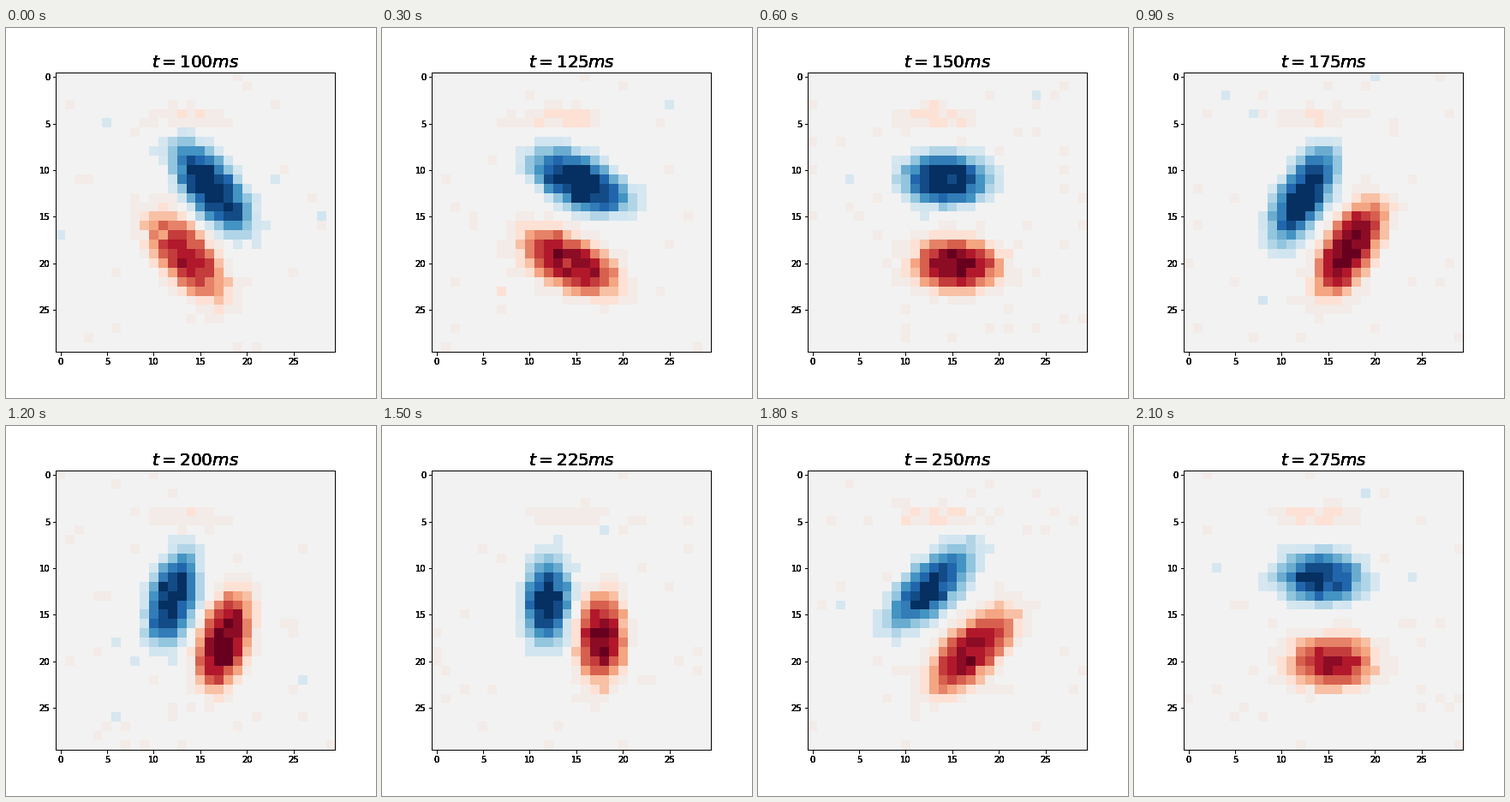
A matplotlib script that plays this animation: 432x432 px, repeating every 2.4 s.

```python
import matplotlib.pyplot as plt
import numpy as np
from matplotlib.animation import FuncAnimation
from matplotlib.colors import LinearSegmentedColormap, to_rgb

SIZE, DPI, CELLS = 432, 72, 30
STEP_MS, STEPS = 300, 8
CENTRE = np.array([14.8, 15.6])

SHADES = LinearSegmentedColormap.from_list("shades", [
    "#67001f", "#b2182b", "#d6604d", "#f4a582", "#fddbc7", "#f2f2f2",
    "#d1e5f0", "#92c5de", "#4393c3", "#2166ac", "#053061"], N=21)
palette = SHADES(np.arange(21))[:, :3]
palette[8:12] = [to_rgb(c) for c in ("#fde1d5", "#f3ebe7", "#f2f2f2", "#d6e7f0")]

rows, cols = np.mgrid[:CELLS, :CELLS]


def lobe(centre, long, short, tilt):
    """Flat-topped ellipse, tilted clockwise."""
    x, y = cols - centre[0], rows - centre[1]
    u = x * np.cos(tilt) + y * np.sin(tilt)
    v = y * np.cos(tilt) - x * np.sin(tilt)
    return np.exp(-((u / long) ** 2 + (v / short) ** 2) ** 1.5)


def signal(t):
    """A blue and a red lobe that swing around each other."""
    tilt = np.radians(np.interp(t, [100, 150, 175, 225, 275],
                                [50, 2, -60, -88, 0]))
    upright = np.sin(tilt) ** 2
    lean = 0.55 * tilt - np.radians(8)
    offset = (4.6 - 1.1 * upright) * np.array([np.sin(lean), -np.cos(lean)])
    shape = (4.6 + 1.2 * abs(np.sin(2 * tilt)), 2.8 - 0.3 * upright, tilt)

    phase = (t - 100) / 175
    blue = (1.12 - 0.15 * phase) * lobe(CENTRE + offset, *shape)
    red = (0.83 + 0.2 * np.sin(np.pi * phase)) * lobe(CENTRE - offset, *shape)
    halo = (0.1 + 0.09 * np.cos(tilt)) * lobe((13.5, 4.4), 4.5, 1.3, 0)
    return blue - red - halo


def field(step):
    rng = np.random.default_rng(40 + step)
    v = signal(100 + 25 * step)
    v *= 1 + 0.05 * rng.standard_normal(v.shape)
    v += 0.025 * rng.standard_t(6, v.shape)
    level = np.clip(np.rint(v * 10), -10, 10).astype(int)
    level[(v > 0) & (v < 0.1)] = 0
    return palette[level + 10]


fields = [field(s) for s in range(STEPS)]

fig = plt.figure(figsize=(SIZE / DPI, SIZE / DPI), dpi=DPI, facecolor="white")
fig.subplots_adjust(left=0.125, right=0.9, bottom=0.125, top=0.88)

# Stacked axes darken the soft edges of ticks and text
layers = [fig.add_subplot(label=str(i), facecolor="none") for i in range(6)]
image = layers[0].imshow(fields[0], interpolation="nearest")
for ax in layers:
    ax.set(xlim=(-0.5, CELLS - 0.5), ylim=(CELLS - 0.5, -0.5), aspect="equal",
           xticks=range(0, CELLS, 5), yticks=range(0, CELLS, 5))
titles = [ax.set_title("", fontsize=20) for ax in layers]


def update(step):
    image.set_data(fields[step])
    for title in titles:
        title.set_text(f"$t={100 + 25 * step}ms$")
    return [image, *titles]


anim = FuncAnimation(fig, update, frames=STEPS, interval=STEP_MS,
                     repeat=True, repeat_delay=0, blit=False)
plt.show()
```
